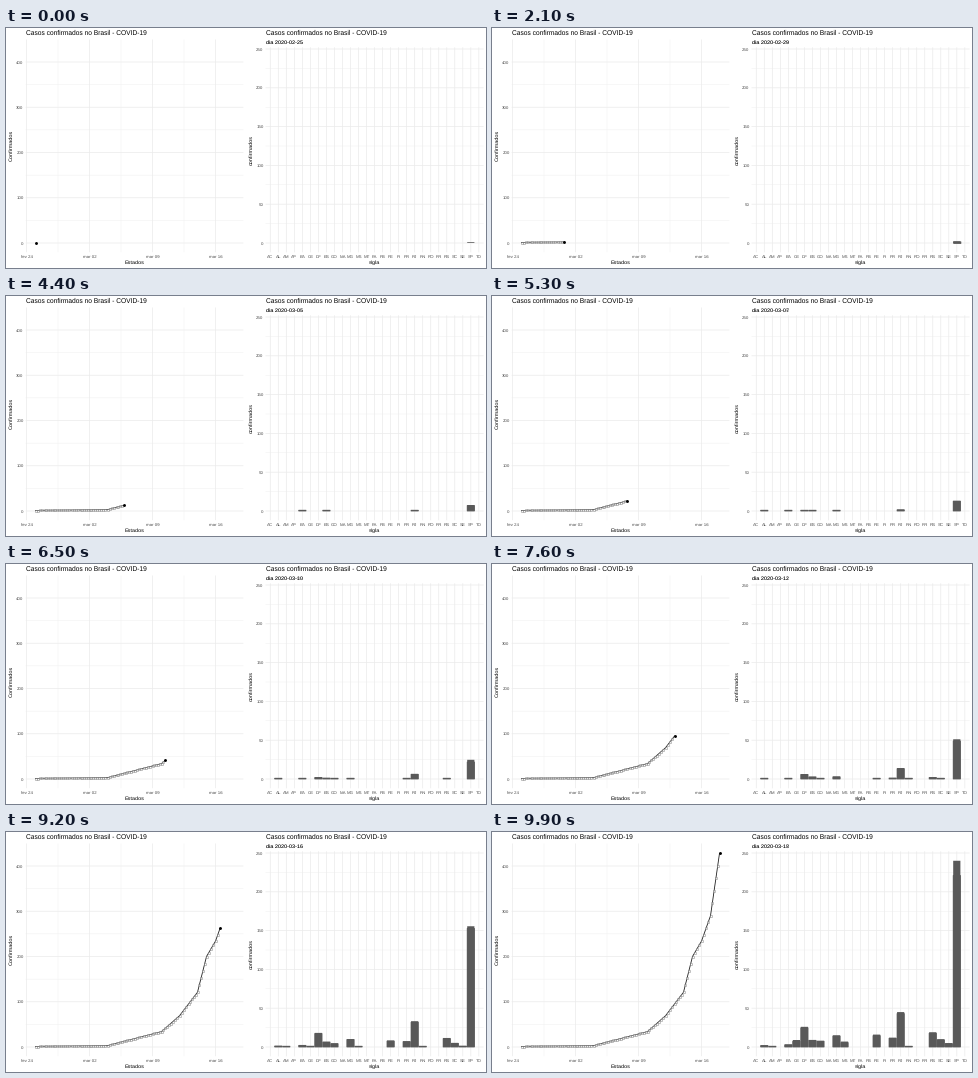
A matplotlib script for the animation above (10 s loop, 480 by 240 pixels).

```python
import matplotlib.pyplot as plt
import numpy as np
from matplotlib.animation import FuncAnimation
from matplotlib.collections import PatchCollection
from matplotlib.patches import Rectangle

W, H, DPI, FRAMES, LAST = 480, 240, 80, 100, 22
PT = 72 / DPI  # points per pixel
BASE = 215     # height of the zero line
plt.rcParams.update({"font.family": "Liberation Sans", "text.hinting": "none",
                     "text.hinting_factor": 8})

STATES = ("AC AL AM AP BA CE DF ES GO MA MG MS MT PA PB PE PI PR RJ RN "
          "RO RR RS SC SE SP TO").split()
# First day with a case and count on the last day; growth is a power curve
OUTBREAKS = dict(AL=(11, 2), AM=(17, 1), BA=(8, 3), CE=(19, 9), DF=(10, 26),
                 ES=(8, 9), GO=(14, 8), MG=(11, 15), MS=(19, 7), PE=(15, 16),
                 PR=(13, 12), RJ=(8, 45), RN=(16, 1), RS=(13, 19),
                 SC=(15, 10), SE=(18, 5))
GROWTH = 2.5

# Turning points as (day, cases)
TOTAL = [(0, 1), (8, 3), (14, 34), (16, 69), (18, 121), (19, 200),
         (20, 234), (21, 290), (22, 428)]
SAO_PAULO = [(0, 1), (8, 3), (14, 19), (18, 65), (19, 136), (21, 164),
             (22, 240)]


def day_x(d):
    return 29.5 + 9 * np.asarray(d)


def total_y(v):
    return BASE - 0.4525 * np.asarray(v)


def state_x(k):
    return 264.3 + 8.02 * k


def case_y(v):
    return BASE - 0.776 * np.asarray(v)


def outbreak(day, first, final):
    t = np.clip((day - first) / (LAST - first), 0, 1)
    return np.where(day > first, np.maximum(1, final * t ** GROWTH), 0)


# Each day lands on a whole frame; motion between days is linear
days = np.arange(LAST + 1)
ticks = np.arange(FRAMES)
step = (FRAMES - 1) / LAST
line_day = np.interp(ticks, np.round(step * days), days)
bar_day = np.interp(ticks, np.round(step * days + 1) - 1, days)

key_day, key_total = np.transpose(TOTAL)
px, py = day_x(key_day), total_y(key_total)
dot_x = day_x(line_day)
dot_y = np.interp(dot_x, px, py)
heights = {s: outbreak(bar_day, *o) for s, o in OUTBREAKS.items()}
heights["SP"] = np.interp(bar_day, *np.transpose(SAO_PAULO))

fig = plt.figure(figsize=(W / DPI, H / DPI), dpi=DPI, facecolor="white")
ax = fig.add_axes([0, 0, 1, 1])
ax.set_xlim(0, W)
ax.set_ylim(H, 0)
ax.axis("off")


def text(x, y, s, size=5.5, color="black", **kw):
    kw.setdefault("va", "baseline")
    return ax.text(x, y, s, fontsize=size * PT, color=color, **kw)


def grid(box, xs, ys, lw):
    x0, x1, y0, y1 = box
    style = dict(color="#ebebeb", lw=lw * PT, zorder=0, snap=False)
    ax.vlines(xs, y0, y1, **style)
    ax.hlines(ys, x0, x1, **style)


def panel(box, x_ticks, y_ticks, x_name, y_name, name_x):
    x0, x1, y0, y1 = box
    grid(box, list(x_ticks), list(y_ticks), 0.72)
    for x, s in x_ticks.items():
        text(x, 229.6, s, 4.4, "#4d4d4d", ha="center")
    for y, s in y_ticks.items():
        text(x0 - 2, y + 1.6, s, 4.4, "#4d4d4d", ha="right")
    text(x0, 7, "Casos confirmados no Brasil - COVID-19", 6.6)
    text((x0 + x1) / 2, 236, x_name, ha="center")
    text(name_x, (y0 + y1) / 2, y_name, rotation=90, ha="center", va="center")


left = (19.6, 237.4, 11.5, 224.2)
right = (259.5, 477.6, 19.3, 224.3)
grid(left, day_x([2.5, 9.5, 16.5]), total_y(range(50, 400, 100)), 0.36)
grid(right, [], case_y(range(25, 250, 50)), 0.36)
weeks = ["fev 24", "mar 02", "mar 09", "mar 16"]
panel(left, {day_x(7 * k - 1): s for k, s in enumerate(weeks)},
      {total_y(v): str(v) for v in range(0, 401, 100)},
      "Estados", "Confirmados", 5.2)
panel(right, {state_x(k): s for k, s in enumerate(STATES)},
      {case_y(v): str(v) for v in range(0, 251, 50)},
      "sigla", "confirmados", 245.4)

curve, = ax.plot([], [], color="#222222", lw=0.85 * PT, zorder=3, snap=False)
trail = ax.scatter([], [], s=(2.4 * PT) ** 2, facecolor=(1, 1, 1, 0.5),
                   edgecolor="#7a7a7a", lw=0.45 * PT, zorder=4, snap=False)
dot, = ax.plot([], [], "o", color="black", ms=2.9 * PT, mew=0, zorder=5,
               snap=False)
bars = PatchCollection([], facecolor="#595959", edgecolor="none", zorder=3,
                       snap=False)
# Earlier bars leave a slightly wider body behind
body = PatchCollection([], facecolor="#595959", edgecolor="#595959",
                       lw=0.8 * PT, zorder=3, snap=False)
ax.add_collection(bars)
ax.add_collection(body)
ghost = text(right[0], 15.8, "", color="#a0a0a0")
date = text(right[0], 15.8, "")


def date_text(d):
    return f"dia 2020-02-{25 + d}" if d < 5 else f"dia 2020-03-{d - 4:02d}"


def bar_shapes(i):
    shapes = []
    for s, h in heights.items():
        if h[i] > 0:
            x, y = state_x(STATES.index(s)), case_y(h[i])
            shapes.append(Rectangle((x - 3.6, y), 7.2, BASE - y))
    return shapes


def update(i):
    d = i * LAST // (FRAMES - 1)
    date.set_text(date_text(d))
    ghost.set_text(date_text(max(d - 1, 0)))

    done = key_day < line_day[i]
    curve.set_data(np.append(px[done], dot_x[i]), np.append(py[done], dot_y[i]))
    trail.set_offsets(np.column_stack([dot_x[:i], dot_y[:i]]))
    dot.set_data([dot_x[i]], [dot_y[i]])

    bars.set_paths(bar_shapes(i))
    body.set_paths(bar_shapes(i - 1) if i else [])
    return curve, trail, dot, bars, body, ghost, date


anim = FuncAnimation(fig, update, frames=FRAMES, interval=100,
                     repeat=True, repeat_delay=0, blit=False)
plt.show()
```
